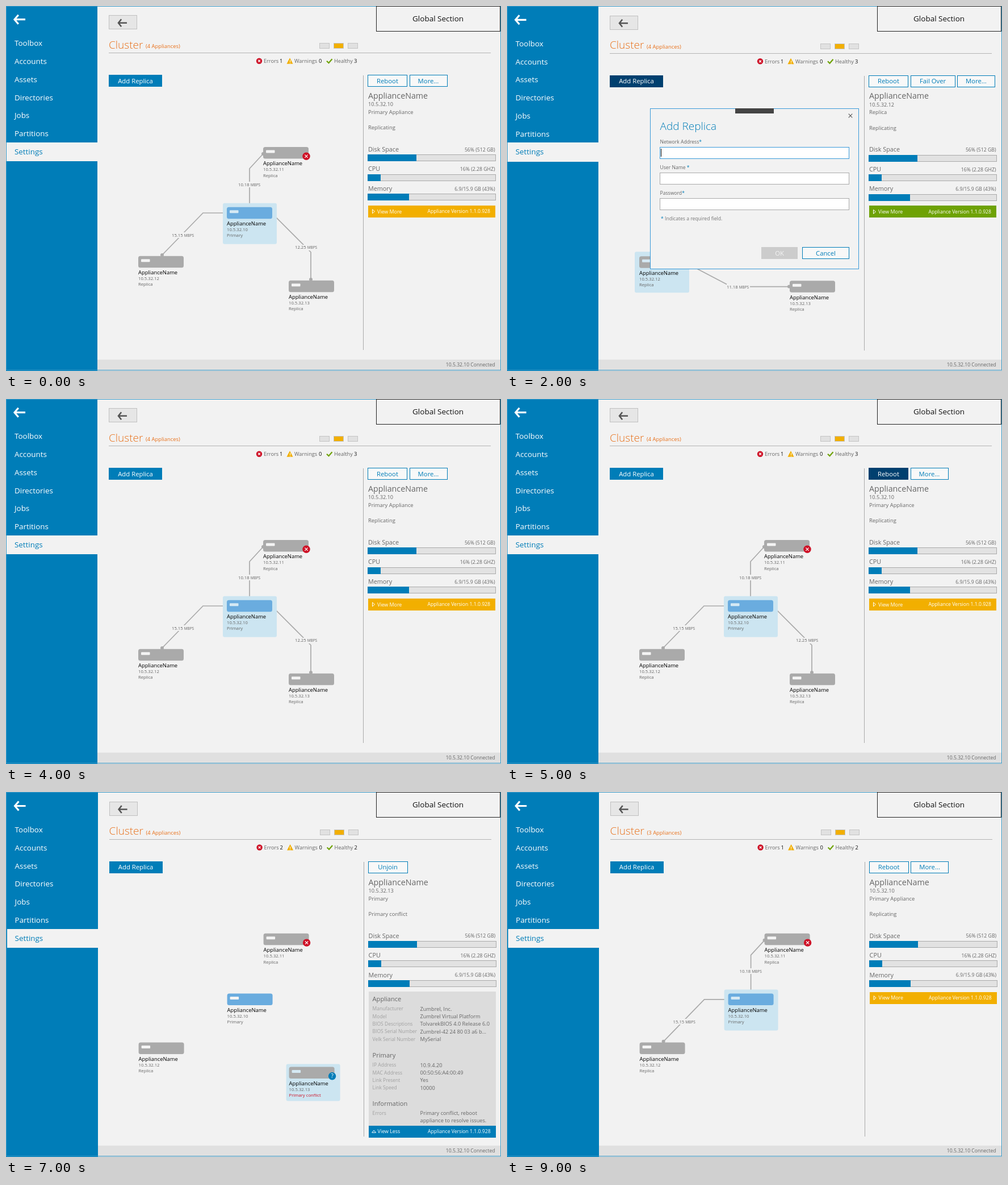
An HTML page for the animation above (10 s loop, 872 px wide and 642 px high).

```html
<!DOCTYPE html>
<html lang="en">
<head>
<meta charset="utf-8">
<title>Cluster settings</title>
<style>
html, body { margin: 0; width: 100%; height: 100%; overflow: hidden; background: #f2f2f2; }
svg { display: block; width: 100vw; height: 100vh; font-family: "Open Sans", "Noto Sans", sans-serif; }
rect { shape-rendering: crispEdges; }
rect.round { shape-rendering: auto; }
text { white-space: pre; }
</style>
</head>
<body>
<svg id="stage" viewBox="0 0 872 642"></svg>
<script>
const BLUE = '#007db8', NAVY = '#00406f', GREEN = '#6ea204', AMBER = '#f2af00';
const RED = '#ce1126', GREY = '#aaaaaa', PAGE = '#f2f2f2', INK = '#666666';
const STEP = 1000;

// Drawing helpers; text is placed by the middle of its capitals.
const rect = (x, y, w, h, fill, more = '') =>
  `<rect x="${x}" y="${y}" width="${w}" height="${h}" fill="${fill}" ${more}/>`;
const round = (x, y, w, h, fill, r) => rect(x, y, w, h, fill, `rx="${r}" class="round"`);
const frame = (x, y, w, h, fill, stroke) => rect(x + .5, y + .5, w - 1, h - 1, fill, `stroke="${stroke}"`);
const text = (x, y, size, fill, str, more = '') =>
  `<text x="${x}" y="${(y + size * .36).toFixed(2)}" font-size="${size}" fill="${fill}" ${more}>${str}</text>`;
const END = 'text-anchor="end"', MID = 'text-anchor="middle"', LIGHT = 'font-weight="300"';
const line = (d, stroke, width) => `<path d="${d}" fill="none" stroke="${stroke}" stroke-width="${width}"/>`;
const shape = (d, fill) => `<path d="${d}" fill="${fill}"/>`;
const dot = (x, y, r, fill) => `<circle cx="${x}" cy="${y}" r="${r}" fill="${fill}"/>`;
const cross = (x, y, r, stroke, w) => line(`M${x - r} ${y - r}l${2 * r} ${2 * r}m0 ${-2 * r}l${-2 * r} ${2 * r}`, stroke, w);
const arrow = (x, y, w, h, stroke, sw) =>
  line(`M${x + w} ${y}H${x + 2}M${x + h * .55} ${y - h / 2}L${x + 2} ${y}L${x + h * .55} ${y + h / 2}`, stroke, sw);

// pad: left, top, width and height of the selection box around a node.
const nodes = {
  11: { x: 453, y: 248 },
  10: { x: 389, y: 353.7, pad: [7, 7, 95, 72] },
  12: { x: 233, y: 439.7, pad: [8, 8, 96, 72] },
  13: { x: 498, y: 482.7, pad: [5, 5, 95, 65] },
};

// Each link: path, end dot, label position, speed.
const up = ['M453 260L429 286V354', 453, 260, 409, 314, '10.18'];
const left = ['M389 364H347L275 438', 275, 438, 292, 403, '15.15'];
const down = ['M469 365L537 433V483', 537, 481, 509, 424.5, '12.25'];
const replicaLinks = [
  ['M453 259.5L335 320.5L274 439.5', 453, 259.5, 300, 349, '15.15'],
  ['M389 364.5L339 389.5L313 449.5', 389, 364.5, 313, 406.5, '10.18'],
  ['M313 450.2L388 489.5L393 493H498', 497, 493, 387, 493.5, '11.18'],
];

const base = {
  dx: 0, dy: 0, count: 4, errors: 1, healthy: 3, sel: 10, ids: [11, 10, 12, 13], links: [],
  badges: { 11: 'error' }, ip: '10.5.32.10', role: 'Primary Appliance', status: 'Replicating',
  buttons: [['Reboot', 70], ['More...', 67]], bar: AMBER,
};
const primary = { ...base, links: [up, left, down] };
const replica = {
  ...base, dy: .6, sel: 12, ip: '10.5.32.12', role: 'Replica', links: replicaLinks, bar: GREEN,
  buttons: [['Reboot', 70], ['Fail Over', 79], ['More...', 67]],
};
const conflict = {
  ...base, dx: .6, dy: .8, errors: 2, healthy: 2, sel: 13, ip: '10.5.32.13', role: 'Primary',
  status: 'Primary conflict', buttons: [['Unjoin', 70]], bar: BLUE, conflict: true,
  badges: { 11: 'error', 13: 'ask' }, details: ['Primary conflict, reboot', 'appliance to resolve issues.'],
};
const scenes = [
  primary,
  replica,
  { ...replica, dialog: true },
  { ...replica, ip: '10.10.10.10', details: ['NA'] },
  primary,
  { ...primary, pressed: 'Reboot' },
  { ...base, dx: .6, status: 'Rebooting', disabled: true, bar: '#c8c8c8', badges: { 11: 'error', 10: 'busy' } },
  conflict,
  { ...conflict, dy: 0, pressed: 'Unjoin' },
  { ...primary, dx: .6, dy: .8, count: 3, healthy: 2, ids: [11, 10, 12], links: [up, left] },
];

function button(x, y, w, label, kind) {
  const [fill, edge, ink] = {
    plain: ['#f8f8f8', BLUE, BLUE], off: [PAGE, '#cccccc', '#c4c4c4'],
    solid: [BLUE, BLUE, '#fff'], down: [NAVY, NAVY, '#fff'], mute: ['#cccccc', '#cccccc', '#f4f4f4'],
  }[kind];
  return frame(x, y, w, 21, fill, edge) + text(x + w / 2, y + 10.5, 11.3, ink, label, MID);
}

function sidebar() {
  const items = ['Toolbox', 'Accounts', 'Assets', 'Directories', 'Jobs', 'Partitions', 'Settings'];
  return rect(-2, -2, 163, 646, BLUE) + arrow(13, 23.7, 21, 16, '#fff', 3.2) +
    rect(1, 239.8, 160, 33.4, PAGE) +
    items.map((t, i) => text(15, 65.5 + i * 31.75, 13.4, i === 6 ? BLUE : '#fff', t)).join('');
}

function header(s) {
  const pill = (x, fill) => frame(x, 65, 18, 10, fill, '#c4c4c4');
  const stat = (x, nx, name, n) => text(x, 96.7, 9.2, INK, name) + text(nx, 96.7, 9.4, '#111', n);
  return frame(181, 16, 50, 25, '#e6e6e6', '#c0c0c0') + arrow(196, 29.7, 17, 13, '#555', 2.6) +
    text(181, 67.8, 19, '#e8701a', 'Cluster', LIGHT) +
    text(246, 70.7, 9.4, '#e8701a', `(${s.count} Appliances)`) +
    pill(552, '#e1e1e1') + pill(577, AMBER) + pill(602, '#e1e1e1') + rect(181, 82, 673, 1, '#b4b4b4') +
    dot(446, 96.7, 5.2, RED) + cross(446, 96.7, 1.9, '#fff', 1.3) + stat(454, 482, 'Errors', s.errors) +
    shape('M500 91.2L505.5 101.7H494.5Z', AMBER) + rect(499.5, 95, 1, 4, '#fff') + rect(499.5, 100, 1, 1, '#fff') +
    stat(508, 551, 'Warnings', 0) +
    line('M565 96.7L568.5 100.2L574.5 93.2', GREEN, 2.2) + stat(578, 613, 'Healthy', s.healthy) +
    button(181, 121, 94, 'Add Replica', s.dialog ? 'down' : 'solid');
}

function link([d, x, y, lx, ly, speed]) {
  return line(d, GREY, 1.7) + dot(x, y, 3, GREY) + rect(lx, ly - 5, 41, 10, PAGE) +
    text(lx, ly, 7.7, INK, `${speed} <tspan font-size="6.5">MBPS</tspan>`);
}

function badge(kind, x, y) {
  if (kind === 'error') return dot(x, y, 6.7, RED) + cross(x, y, 2.6, '#fff', 1.2);
  if (kind === 'busy') return dot(x, y, 6.7, '#555') + [-3, 0, 3].map(k => dot(x + k, y, 1, '#fff')).join('');
  return dot(x, y, 6.7, BLUE) + text(x, y, 10, '#fff', '?', MID);
}

function node(id, s) {
  const { x, y, pad } = nodes[id], picked = s.sel === id, main = id === 10;
  const bad = id === 13 && s.conflict, mark = s.badges[id];
  return (picked ? round(x - pad[0], y - pad[1], pad[2], pad[3], '#cce5f1', 3) : '') +
    round(x, y, 80, 20.5, main ? '#6aacdf' : GREY, 3.5) +
    round(x + 5, y + 5.5, 15.5, 5, picked ? '#d5e9f4' : '#f4f4f4', 1) +
    text(x, y + 29, 9.4, '#000', 'ApplianceName', 'font-weight="500"') +
    text(x, y + 39.5, 7.7, INK, `10.5.32.${id}`) +
    text(x, y + 50, 7.7, bad ? RED : INK, bad ? 'Primary conflict' : main ? 'Primary' : 'Replica') +
    (mark ? badge(mark, x + (mark === 'busy' ? 77 : 76), y + 16.3) : '');
}

function details(s) {
  const shift = s.conflict ? 1 : 0;
  const head = (y, t) => text(645, y + shift, 11.1, INK, t);
  const rows = (y, list) => list.map(([k, v], i) =>
    text(645, y + shift + i * 13.3, 8.5, '#a0a0a0', k) + text(729, y + shift + i * 13.3, 9.2, INK, v)).join('');
  return rect(638, 348.8 + shift, 224, 237, '#dcdcdc') +
    head(362.5, 'Appliance') + rows(379.5, [
      ['Manufacturer', 'Zumbrel, Inc.'], ['Model', 'Zumbrel Virtual Platform'],
      ['BIOS Descriptions', 'TolvarekBIOS 4.0 Release 6.0'],
      ['BIOS Serial Number', 'Zumbrel-42 24 80 03 a6 b...'], ['Velk Serial Number', 'MySerial']]) +
    head(461, 'Primary') + rows(478.5, [
      ['IP Address', '10.9.4.20'], ['MAC Address', '00:50:56:A4:00:49'],
      ['Link Present', 'Yes'], ['Link Speed', '10000']]) +
    head(546, 'Information') + rows(563, s.details.map((t, i) => [i ? '' : 'Errors', t]));
}

function panel(s) {
  const meter = (y, name, value, w) => text(638, y, 10.8, INK, name) + text(861.5, y + .5, 8.7, INK, value, END) +
    frame(637, y + 9, 226, 12, '#e2e2e2', GREY) + rect(637, y + 9, w, 12, BLUE);
  let x = 637, out = rect(629, 122, 1, 483, GREY);
  for (const [label, w] of s.buttons) {
    out += button(x, 121, w, label, s.disabled ? 'off' : s.pressed === label ? 'down' : 'plain');
    x += w + 3.5;
  }
  const y = !s.details ? 350.8 : s.conflict ? 585.8 : 584.8;
  const ink = s.disabled ? '#f0f0f0' : '#fff';
  const tip = s.details ? `M644 ${y + 12.5}h7l-3.5 -4z` : `M645.5 ${y + 7}v7l4 -3.5z`;
  return out + text(638, 157.7, 14.25, INK, 'ApplianceName') + text(638, 172.7, 9.2, INK, s.ip) +
    text(638, 186.5, 9.4, INK, s.role) + text(638, 214, 9.4, INK, s.status) +
    meter(252, 'Disk Space', '56% (512 GB)', 86) + meter(286.5, 'CPU', '16% (2.28 GHZ)', 23) +
    meter(321, 'Memory', '6.9/15.9 GB (43%)', 73) +
    (s.details ? details(s) : '') + rect(638, y, 224, 21, s.bar) + line(tip, ink, 1) +
    text(654, y + 10.5, 8.9, ink, s.details ? 'View Less' : 'View More') +
    text(853, y + 10.5, 8.65, ink, 'Appliance Version 1.1.0.928', END);
}

function dialog() {
  const edge = '#3a9ad9', star = `<tspan fill="${BLUE}">*</tspan>`;
  const field = (y, name, stroke) =>
    text(269.5, y, 8.6, INK, name + star) + frame(269, y + 9, 334, 21, '#fff', stroke);
  return frame(252, 180, 368, 283, PAGE, edge) + rect(402, 180, 68, 9, '#444') +
    cross(605, 193, 3.3, '#555', 1.1) +
    text(269.5, 211.5, 19, BLUE, 'Add Replica', LIGHT) +
    field(239, 'Network Address', edge) + rect(271, 251, 1, 14, '#000') +
    field(284, 'User Name ', GREY) + field(329, 'Password', GREY) +
    text(271, 374, 8.6, '#777', star + ' Indicates a required field.') +
    button(448, 424, 64, 'OK', 'mute') + button(520, 424, 83, 'Cancel', 'plain');
}

function draw(s) {
  return rect(0, 0, 872, 642, PAGE) + rect(161, 622, 711, 20, '#e0e0e0') +
    `<g transform="translate(${s.dx} ${s.dy})">` + sidebar() + header(s) +
    s.links.map(link).join('') + s.ids.map(id => node(id, s)).join('') + panel(s) + '</g>' +
    (s.dialog ? dialog() : '') +
    text(861.5, 631, 8.6, INK, '10.5.32.10 Connected', END) +
    frame(0, 0, 871.5, 641, 'none', '#3a9ac8') +
    frame(652, 0, 219, 45, PAGE, '#222') + text(716, 22, 13.5, '#111', 'Global Section');
}

const stage = document.getElementById('stage');
let shown = -1;
function tick(now) {
  const i = Math.floor(now / STEP) % scenes.length;
  if (i !== shown) stage.innerHTML = draw(scenes[shown = i]);
  requestAnimationFrame(tick);
}
tick(performance.now());
</script>
</body>
</html>
```
